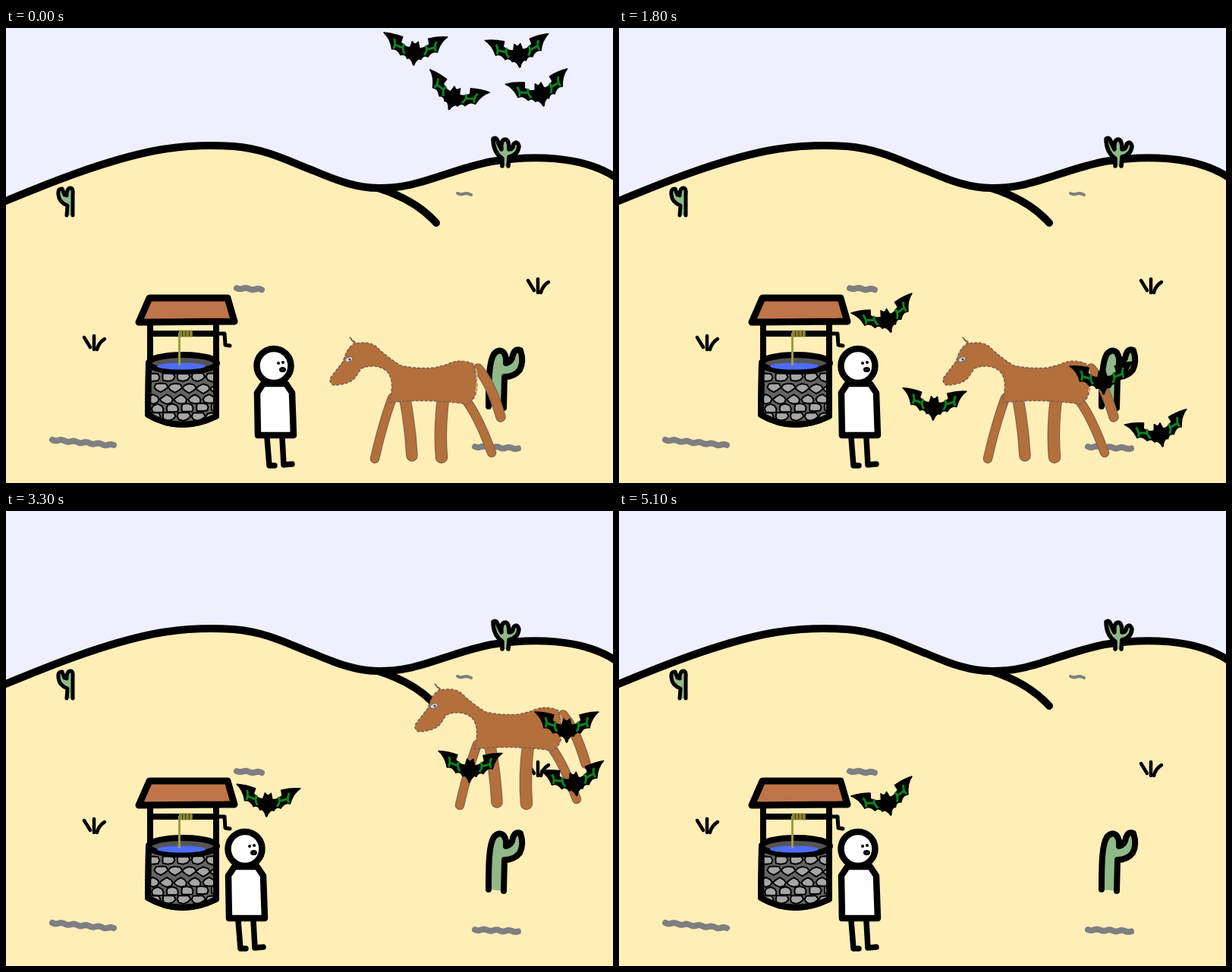
Recreate the animation shown at these times as an HTML page. Size 800 by 600 pixels, loop 7.1 s.

```html
<!DOCTYPE html>
<html>
<head>
<meta charset="utf-8">
<style>
html, body { margin: 0; width: 100%; height: 100%; overflow: hidden; background: #ffeeb6; }
svg { display: block; width: 800px; height: 600px; }
.ink, .dust { stroke: #000; stroke-linecap: round; stroke-linejoin: round; fill: none; }
.dust { stroke: #7f7f82; }
.sky { fill: #eef0fe; }
.cactus { fill: #90b988; }
.white { fill: #fff; }
.wood { fill: #c07548; }
.wall { fill: #646464; }
.inside { fill: #555; }
.stone { fill: #a6a6a6; }
.coat { fill: #b36f3c; stroke: #7a5f50; stroke-width: 1.5; stroke-dasharray: 4 2; stroke-linejoin: round; }
.limb { fill: none; stroke-linecap: round; }
</style>
</head>
<body>
<svg viewBox="0 0 800 600">
  <defs>
    <g id="half-bat">
      <path d="M42 0Q30 0 17 4L19 11Q12 18 6 17L4 9L1 12H-1V39L0 40Q5 29 9 32Q12 25 18 28Q23 19 30 21Q33 7 42 0Z" stroke="#000" stroke-width="1.5" stroke-linejoin="round"/>
      <path d="M28 7Q25 14 28 20M14 13Q18 18 13 26M26 15L17 18" fill="none" stroke="#0b8420" stroke-width="3"/>
    </g>
    <g id="bat">
      <use href="#half-bat"/>
      <use href="#half-bat" transform="scale(-1 1)"/>
    </g>
    <path id="bucket" d="M188 442L187 510Q230 535 277 512V442"/>
    <clipPath id="wall"><use href="#bucket"/></clipPath>
  </defs>

  <!-- landscape -->
  <rect width="800" height="600" fill="#ffeeb6"/>
  <g class="ink" stroke-width="10">
    <path class="sky" d="M-5 230C60 203 130 175 195 162C230 155 270 154 300 156C345 160 371 175 405 188C440 203 465 211 490 211C545 212 580 188 640 176C690 168 760 167 805 198V-5H-5Z"/>
    <path d="M490 211C525 222 550 238 567 257"/>
  </g>
  <g id="ground"></g>
  <g class="ink" stroke-width="4.5">
    <path id="tuft" d="M103 408L111 421M116 406V424M130 410Q122 415 120 424"/>
    <use href="#tuft" transform="translate(585 -75)"/>
  </g>
  <g class="ink">
    <path class="cactus" stroke-width="5" d="M80 247L81 234Q70 230 69 220Q68 211 74 212L77 220L80 221Q80 211 85 211Q89 211 88 220V247"/>
    <path class="cactus" stroke-width="5.5" d="M654 182V172Q642 164 642 146Q647 143 649 152L653 160Q652 147 658 147Q663 147 663 160Q668 160 669 153Q674 148 676 156Q675 167 663 170L662 182"/>
    <path class="cactus" stroke-width="8" d="M636 499C636 460 637 440 643 430Q650 422 656 428Q660 434 659 442Q667 440 668 431Q671 422 678 425Q683 440 677 451Q670 460 657 460L656 501"/>
  </g>

  <!-- well -->
  <g class="ink" stroke-width="8">
    <path d="M190 390V440M277 390V440M190 403H277"/>
    <path d="M277 403H288L289 418L295 419" stroke-width="5"/>
    <use href="#bucket" class="wall"/>
    <g id="stones" clip-path="url(#wall)" stroke-width="2"></g>
    <use href="#bucket"/>
    <ellipse class="inside" cx="233" cy="442" rx="45" ry="11"/>
    <ellipse cx="231" cy="446" rx="32" ry="4.5" stroke="none" fill="#4d6cf8"/>
    <path class="wood" d="M189 356H292L301 387L175 388Z" stroke-width="9"/>
  </g>
  <path d="M228.500 402V445" stroke="#a09a48" stroke-width="3"/>
  <path d="M228 403H246" stroke="#89842f" stroke-width="9" stroke-dasharray="4 .6"/>

  <g id="person" class="ink" stroke-width="8.500">
    <path d="M306 540L309 577H316M326 540L328 576L339 575" stroke-width="7.500"/>
    <path class="white" d="M301 469L293 481L294 537H341L339 481L331 469Z"/>
    <circle class="white" cx="315" cy="445.500" r="22.500"/>
    <path d="M321 442h.1M327 441h.1" stroke-width="4"/>
    <ellipse cx="326.500" cy="450.500" rx="3" ry="2" class="inside" stroke-width="3"/>
  </g>

  <g id="horse">
    <g id="limbs"></g>
    <path class="coat" d="M453 408L462 416Q482 412 492 424Q505 436 520 445Q542 450 565 448L580 444Q598 435 616 443L621 470Q620 490 608 496Q555 488 505 494Q514 462 500 451Q486 442 468 449L461 460Q454 470 432 471Q425 468 428 461L444 440L447 432Q450 422 459 416Z"/>
    <path d="M619 449Q623 462 619 480" fill="none" stroke="#d8b890" stroke-width="1.500"/>
    <ellipse cx="452" cy="437" rx="5" ry="3" fill="#d8d8e0" stroke="#665" transform="rotate(-20 452 437)"/>
    <circle cx="453" cy="437" r="1.600" fill="#445"/>
  </g>
  <g id="bats"></g>
</svg>
<script>
const byId = id => document.getElementById(id);
const add = (parentId, tag, attrs) => {
  const el = byId(parentId).appendChild(document.createElementNS('http://www.w3.org/2000/svg', tag));
  for (const key in attrs) el.setAttribute(key, attrs[key]);
  return el;
};
const wave = (seed, size) => size * Math.sin(seed * 12.9);
const mix = (a, b, k) => a.map((value, i) => value + (b[i] - value) * k);

// Wavy streak of dust, falling slightly to the right
function streak(x, y, length, slope, width) {
  const points = [];
  for (let d = 0; d <= length; d += 3) points.push([x + d, y + d * slope + Math.sin(d / 2.6)]);
  add('ground', 'polyline', { points: points.join(' '), class: 'dust', 'stroke-width': width });
}
streak(304, 343, 34, .06, 8);
streak(61, 543, 81, .09, 8);
streak(618, 552, 57, .04, 8);
streak(595, 218, 19, .08, 4);

// Staggered rows of irregular stones
for (let i = 0; i < 25; i++) {
  const row = Math.floor(i / 5);
  const x = 194 + i % 5 * 19 + row % 2 * 8 + wave(i, 2), y = 462 + row * 13 + wave(i + .3, 2);
  const points = Array.from({ length: 8 }, (_, k) => {
    const angle = k * Math.PI / 4, bulge = 1 + wave(i + k * .7, .15);
    return [x + 8.5 * bulge * Math.cos(angle), y + 5.8 * bulge * Math.sin(angle)];
  });
  add('stones', 'polygon', { points: points.join(' '), class: 'stone' });
}

function limb(d, width) {
  add('limbs', 'path', { d, class: 'limb', stroke: '#7a5f50', 'stroke-width': width + 1.5 });
  add('limbs', 'path', { d, class: 'limb', stroke: '#b36f3c', 'stroke-width': width - .5 });
}
limb('M509 488Q497 520 486 568', 11);
limb('M525 485Q533 525 535 564', 14);
limb('M576 490Q571 530 574 566', 15);
limb('M604 488Q622 510 640 560', 11);
limb('M622 449Q640 470 652 513', 12);

// Key poses are [x, y, tilt]; a grip is the place held on the horse
const SWOOP = [-65, 178, 0];
const flock = [
  { start: [540, 9, 4], dive: [374, 281, 3], end: [346, 363, -18] },
  { start: [673, 12, -6], dive: [622, 331, -10], end: [636, 443, -4], grip: [627, 445, 0] },
  { start: [598, 70, 21], dive: [435, 366, 3], end: [416, 477, 3], grip: [500, 498, 2] },
  { start: [699, 64, -14], dive: [649, 375, -10], end: [707, 513, -14], grip: [634, 516, -9] }
];
for (const bat of flock) {
  bat.path = [bat.start, bat.start.map((value, i) => value + SWOOP[i]), bat.dive, bat.end];
  bat.el = add('bats', 'use', { href: '#bat' });
}

const LOOP = 7100, GRAB = 7, GONE = 12;

// Quick steps until the horse is grabbed, then slow ones
const stepAt = time => time < 2100
  ? Math.floor(time / 300)
  : Math.min(GONE, GRAB + Math.floor((time - 2100) / 600));

function batPose({ path, end, grip }, step, lift) {
  if (step < 6) return mix(path[step >> 1], path[(step >> 1) + 1], step % 2 / 2);
  if (!grip) return [end[0], end[1], end[2] + 31 * Math.max(0, Math.cos((step - 10) * Math.PI / 4))];
  if (step < GRAB) return end;
  return [grip[0] + lift[0], grip[1] + lift[1], grip[2]];
}

const place = (el, [x, y, tilt = 0]) =>
  el.setAttribute('transform', `translate(${x} ${y}) rotate(${tilt})`);
const show = (el, visible) => el.style.display = visible ? '' : 'none';

function draw() {
  const step = stepAt(performance.now() % LOOP);
  const height = Math.max(0, step - GRAB);
  const lift = height ? [76 * height - 40, Math.max(-315, -90 * height)] : [0, 0];

  place(byId('person'), [38 * (1 - Math.min(1, step / 4) ** 1.25), 0]);
  place(byId('horse'), lift);
  show(byId('horse'), step < GONE);
  for (const bat of flock) {
    place(bat.el, batPose(bat, step, lift));
    show(bat.el, !bat.grip || step < GONE);
  }
  requestAnimationFrame(draw);
}
draw();
</script>
</body>
</html>
```
